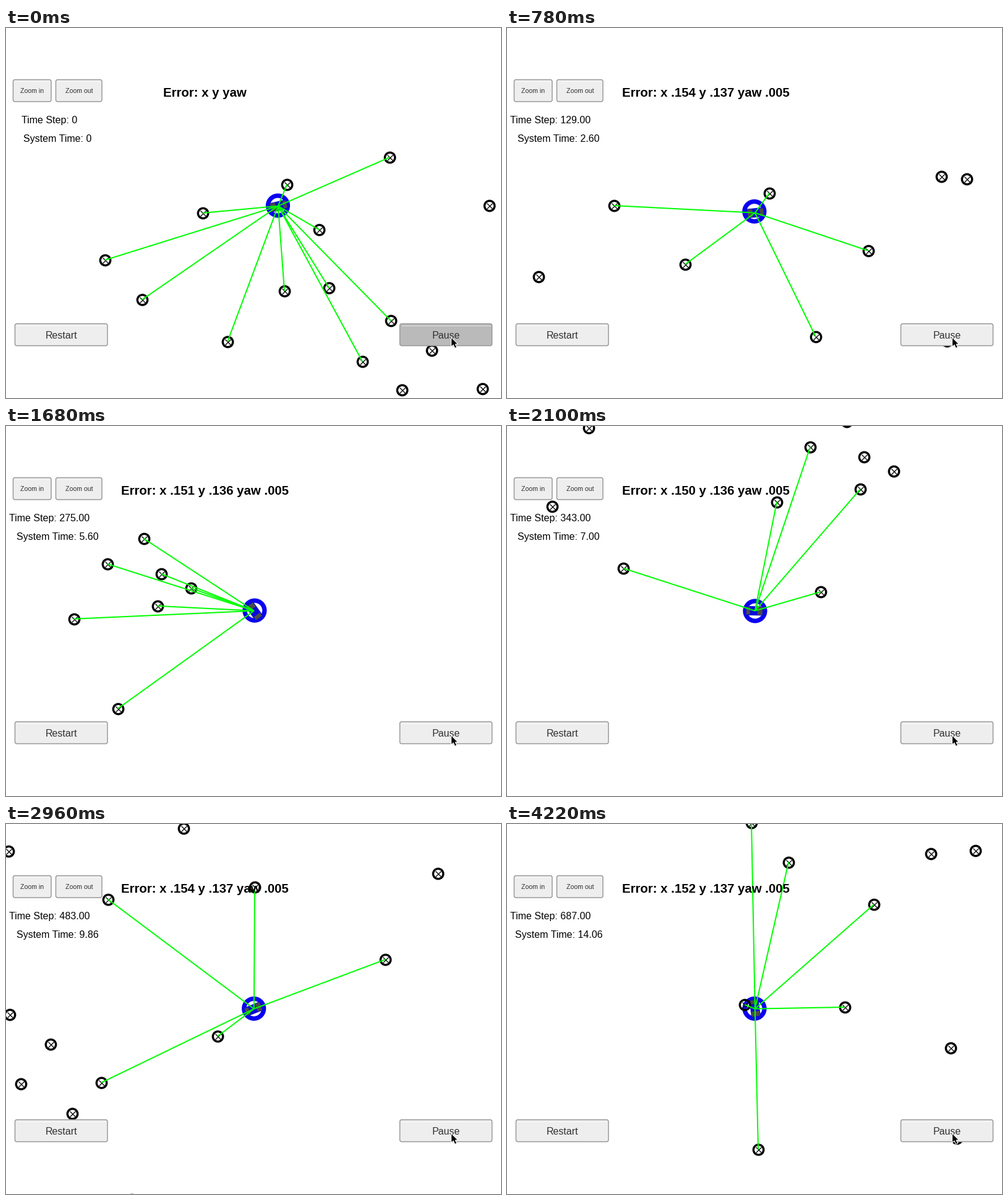
Write a matplotlib script that moves like this. It is 800x598 px and loops after 4.24 s.

```python
import numpy as np
import matplotlib.pyplot as plt
from matplotlib.animation import FuncAnimation
from matplotlib.collections import LineCollection
from matplotlib.patches import Circle, FancyBboxPatch, Polygon

W, H, DPI = 800, 598, 64
FRAMES, INTERVAL = 212, 20
PT = 72 / DPI                      # points per pixel
HUB = np.array([400.8, 298.7])     # where the camera keeps the car
RANGE = 302                        # sensor reach in pixels

# the map the car drives through
LANDMARKS = np.array([
    (620, 209), (454, 253), (318, 299), (160, 375), (220, 439), (358, 507),
    (450, 425), (522, 420), (506, 326), (622, 473), (576, 539), (688, 521),
    (640, 585), (770, 583), (781, 287), (958, 508), (1018, 267), (1229, 384),
    (1314, 245), (903, 172), (1154, 152), (1432, 125), (1473, 129),
    (1441, 391), (1642, 120), (1805, 106), (1583, 247), (1698, 347),
    (1946, 240), (2000, 151), (2059, 110), (2087, 167), (2135, 190),
    (2081, 219), (2017, 385), (723, 633), (819, 772), (482, 739),
    (492, 885), (311, 673), (171, 903), (149, 669)])

# frame, x, y: out to the right, a U-turn, back and down to the left
ROUTE = np.array([
    (0, 39, -11), (39, 730, -115), (64, 1363, -162), (81, 1788, -127),
    (88, 1866, 10), (95, 1733, 119), (105, 1510, 117), (148, 616, 165),
    (182, 97, 556), (197, -141, 558), (211, -235, 377)], float)


def smooth(t, knots, values):
    """Cubic Hermite curve through the knots."""
    slopes = np.gradient(values, knots, axis=0, edge_order=2)
    i = np.clip(np.searchsorted(knots, t, side="right") - 1, 0, len(knots) - 2)
    h = (knots[i + 1] - knots[i])[:, None]
    u = (t - knots[i])[:, None] / h
    return ((2 * u**3 - 3 * u**2 + 1) * values[i]
            + (u**3 - 2 * u**2 + u) * h * slopes[i]
            + (3 * u**2 - 2 * u**3) * values[i + 1]
            + (u**3 - u**2) * h * slopes[i + 1])


path = smooth(np.arange(FRAMES), ROUTE[:, 0], ROUTE[:, 1:])
velocity = np.gradient(path, axis=0)
heading = np.arctan2(velocity[:, 1], velocity[:, 0])
wobble = np.random.default_rng(4).normal((0, -.5), (.6, .9), (FRAMES, 2))

fig = plt.figure(figsize=(W / DPI, H / DPI), dpi=DPI, facecolor="white")
ax = fig.add_axes([0, 0, 1, 1])
ax.set(xlim=(0, W), ylim=(H, 0))
ax.axis("off")


def label(x, y, size, text="", color="black", **kw):
    return ax.text(x, y, text, fontsize=size * PT, color=color, ha="center",
                   va="baseline", family="Liberation Sans", zorder=9, **kw)


def button(x, y, width, text, size):
    height = 35.5
    box = FancyBboxPatch((x, y), width, height,
                         boxstyle="round,pad=0,rounding_size=3",
                         fc="#eeeeee", ec="#999999", lw=1.5 * PT, zorder=7)
    ax.add_patch(box)
    ax.plot([x + 3, x + width - 3], [y + 2.5] * 2, color="white", alpha=.6,
            lw=PT, zorder=8)
    label(x + width / 2, y + height / 2 + .36 * size, size, text, "#323232")
    return box


def car_part(x0, x1, half, color):
    shape = np.array([(x0, -half), (x1, -half), (x1, half), (x0, half)])
    patch = Polygon(shape, fc=color, ec="none", zorder=3)
    ax.add_patch(patch)
    return patch, shape


def marks(shape, size, width):
    return ax.plot([], [], shape, mfc="none", mec="black", ms=size * PT,
                   mew=width * PT, zorder=4, snap=False)[0]


ring = Circle(HUB, 16, fill=False, ec="#0a00f0", lw=7.2 * PT, zorder=2)
ax.add_patch(ring)
car = [car_part(-17, 17, 7.5, "#0a0ad8"), car_part(-12, -4, 6.5, "#4a4a4a"),
       car_part(8, 14, 6, "#4a4a4a")]

landmarks = marks("o", 16.4, 3.4), marks("x", 9, 1.3)
rays = LineCollection([], colors="#00ff00", linewidths=2 * PT, zorder=5)
ax.add_collection(rays)

button(11.5, 83.5, 61.5, "Zoom in", 10.5)
button(80.5, 83.5, 74.5, "Zoom out", 10.5)
button(14.5, 478, 149.5, "Restart", 16)
pause = button(636.5, 478, 149, "Pause", 16)

readouts = (label(321.5, 111, 20.4, weight="bold"), label(70.5, 154, 16),
            label(83.5, 184, 16))

ax.add_patch(Polygon(
    [(719.5, 500), (719.5, 515), (723, 512), (725.5, 517.5), (728.5, 516),
     (726, 511), (730.5, 511)], fc="black", ec="white", lw=PT, zorder=10))


def status(n):
    if n == 0:
        return "Error: x y yaw", "Time Step: 0", "System Time: 0"
    swing = np.cos(2 * np.pi * (n - 148) / 54.5)
    ex, ey = (f"{e:.3f}"[1:] for e in (.149 + .0049 * swing,
                                       .1358 + .0015 * swing))
    return (f"Error: x {ex} y {ey} yaw .005",
            f"Time Step: {round(3.2442 * n + 2.48)}.00",
            f"System Time: {n / 15 - .004:.2f}")


def draw(n):
    # the camera starts following once the run begins
    camera = path[n] if n else np.zeros(2)
    here = HUB + path[n] - camera
    spots = LANDMARKS - camera

    for mark in landmarks:
        mark.set_data(*spots.T)
    near = np.hypot(*(spots - here).T) < RANGE
    rays.set_segments([(here, s) for s in spots[near]])

    ring.center = tuple(here + wobble[n])
    c, s = np.cos(heading[n]), np.sin(heading[n])
    for patch, shape in car:
        patch.set_xy(shape @ [[c, s], [-s, c]] + here)

    for text, value in zip(readouts, status(n)):
        text.set_text(value)
    pause.set_facecolor(str(min(.933, .73 + .1 * n)))
    return ()


anim = FuncAnimation(fig, draw, frames=FRAMES, interval=INTERVAL,
                     init_func=lambda: draw(0), repeat=True, repeat_delay=0)
plt.show()
```
